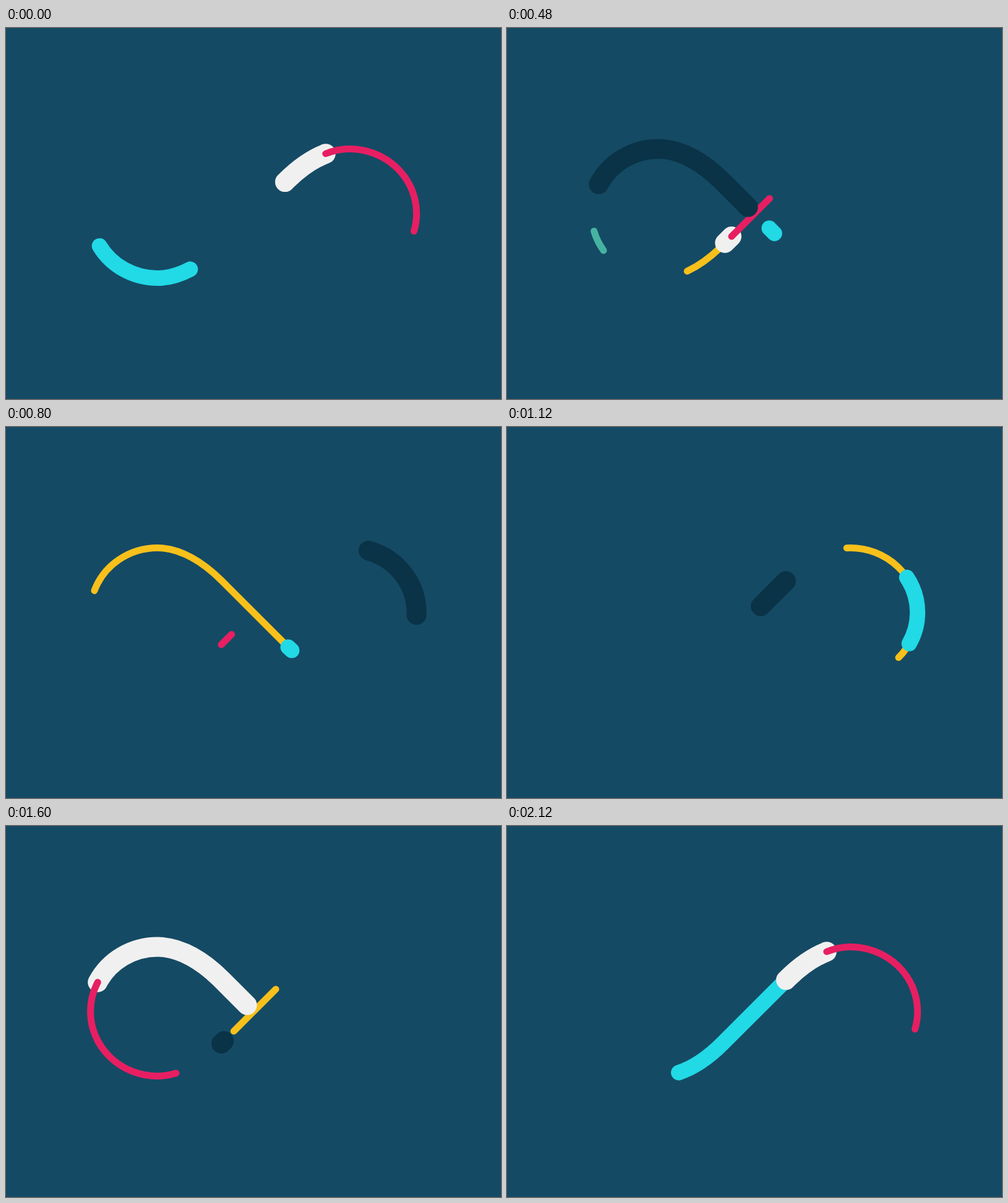
Animation of 800x600 px, one loop 2160 ms. Source, as an HTML page:

```html
<!DOCTYPE html>
<html lang="en">
<head>
<meta charset="utf-8">
<title>Infinity loop</title>
<style>
  html, body { margin: 0; width: 100%; height: 100%; overflow: hidden; background: #154a64; }
  svg { display: block; width: 100vw; height: 100vh; }
  path { fill: none; stroke-linecap: round; stroke-linejoin: round; }
</style>
</head>
<body>
<svg id="stage" viewBox="0 0 800 600"></svg>
<script>
const LOOP = 2160, FRAME = 40, LENGTH = 1432;

const left = 'C320,380 283,404.5 245,404.5 A108.5,104.5 0 0 1 136.5,300 ' +
  'A108.5,104.5 0 0 1 245,195.5 C283,195.5 320,220 348,248 ';
const right = 'C480,380 517,404.5 555,404.5 A108.5,104.5 0 0 0 663.5,300 ' +
  'A108.5,104.5 0 0 0 555,195.5 C517,195.5 480,220 452,248 ';
const fromLeft = `M348,352 ${left}L452,352 ${right}L348,352`;
const fromRight = `M452,352 ${right}L348,352 ${left}L452,352`;

// Bezier easing with control points (a, 0) and (b, 1)
function ease(a, b, x) {
  if (x <= 0) return 0;
  if (x >= 1) return 1;
  let low = 0, high = 1;
  for (let i = 0; i < 30; i++) {
    const u = (low + high) / 2, v = 1 - u;
    if (3 * v * v * u * a + 3 * v * u * u * b + u * u * u < x) low = u;
    else high = u;
  }
  return low * low * (3 - 2 * low);
}

const glide = (time, delay, duration) => LENGTH * ease(0.33, 0.16, (time - delay) / duration);
const snap = time => LENGTH * ease(0.65, 0.083, time / 1342);

// Each motion returns the [tail, head] distance along the path
const thick = time => [glide(time, 145, 1600), glide(time, 25, 1600)];
const thin = time => time > 1900 ? [0, 0] : [glide(time, 255, 1870), glide(time, 145, 1600)];
const quick = time => [snap(time - 45), snap(time)];
const spark = time => time < 0 || time > 200 ? [0, 0] : [141 + time, 176 + time];

const wrapped = t => t < 1120 ? t + 1000 : t - 1120;
const quickPhase = t => t < 666 ? t + 595 : t < 1565 ? t - 666 : t - 1565;

const strokes = [
  ['#46b3a2', 11, fromLeft, t => spark(t - 400)],
  ['#f8c01a', 11, fromLeft, t => thin(t - 160)],
  ['#22d9e6', 25, fromRight, t => quick(quickPhase(t))],
  ['#f0f0f0', 32, fromLeft, t => thick(wrapped(t))],
  ['#e71f62', 11, fromLeft, t => thin(wrapped(t))],
  ['#0a3347', 32, fromLeft, t => thick(t)]
].map(([color, width, d, range]) => {
  const path = document.createElementNS('http://www.w3.org/2000/svg', 'path');
  const attributes = { d, stroke: color, 'stroke-width': width, pathLength: LENGTH };
  for (const name in attributes) path.setAttribute(name, attributes[name]);
  document.getElementById('stage').append(path);
  return { path, range };
});

function draw(t) {
  for (const { path, range } of strokes) {
    const [tail, head] = range(t);
    const size = head - tail;
    path.setAttribute('visibility', size < 1 ? 'hidden' : 'visible');
    path.setAttribute('stroke-dasharray', `${Math.max(size, 0.01)} ${LENGTH * 3}`);
    path.setAttribute('stroke-dashoffset', -tail);
  }
}

const start = performance.now();
function tick() {
  const t = (performance.now() - start) % LOOP;
  draw(Math.floor(t / FRAME) * FRAME);
  requestAnimationFrame(tick);
}
tick();
</script>
</body>
</html>
```
